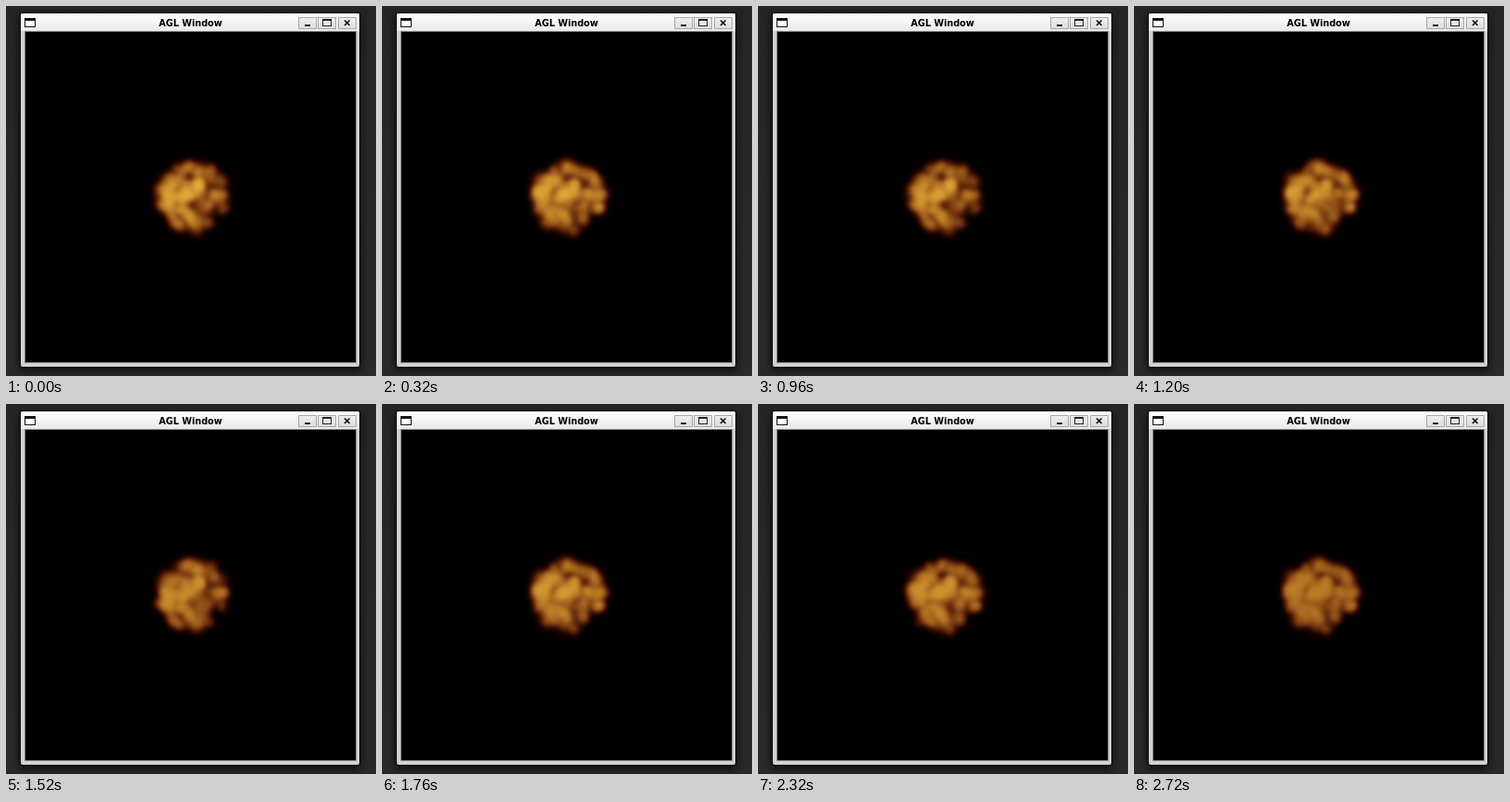
These frames come from a looping animation (400 by 400 pixels, 2880 ms). An HTML page with a canvas:

```html
<!DOCTYPE html>
<html lang="en">
<head>
<meta charset="utf-8">
<title>AGL Window</title>
<style>
html, body { margin: 0; width: 100%; height: 100%; overflow: hidden; background: #262628; }
canvas { display: block; width: 400px; height: 400px; }
</style>
</head>
<body>
<canvas id="stage" width="400" height="400"></canvas>
<script>
const ctx = document.getElementById('stage').getContext('2d');
const LOOP = 2880, STEP = 80, LAST = 34, LIFE = 480;
const SIZE = 120, LEFT = 141, TOP = 147;
const patch = ctx.createImageData(SIZE, SIZE);
const density = new Float32Array(SIZE * SIZE);

// time, brightest tone, how quickly overlapping puffs reach it
const HEAT = [
  [0, .98, 1], [720, .95, .95], [1200, .95, .95],
  [1520, .88, 1.1], [2000, .96, 1], [2720, .8, 1.3]
];

const mix = (a, b, k) => a + (b - a) * k;

function box(x, y, w, h, fill) {
  ctx.fillStyle = fill;
  ctx.fillRect(x, y, w, h);
}

function frame(x, y, w, h, stroke) {
  ctx.strokeStyle = stroke;
  ctx.lineWidth = 1;
  ctx.strokeRect(x + .5, y + .5, w - 1, h - 1);
}

function rounded(x, y, w, h, r, fill) {
  ctx.fillStyle = fill;
  ctx.beginPath();
  ctx.roundRect(x, y, w, h, r);
  ctx.fill();
}

function shade(y, h, top, bottom) {
  const g = ctx.createLinearGradient(0, y, 0, y + h);
  g.addColorStop(0, top);
  g.addColorStop(1, bottom);
  return g;
}

function drawWindow() {
  box(0, 0, 400, 400, shade(0, 400, '#252527', '#29292b'));
  ctx.save();
  ctx.shadowColor = 'rgba(0,0,0,.75)';
  ctx.shadowBlur = 10;
  ctx.shadowOffsetY = 3;
  rounded(15, 7, 368, 384, 3, '#101010');
  ctx.restore();
  rounded(16, 8, 366, 382, 2, '#d2d2d0');
  rounded(16, 8, 366, 19, [2, 2, 0, 0], shade(8, 19, '#ffffff', '#e9e9e8'));
  frame(20, 27, 359, 359, '#80807e');
  box(21, 28, 357, 357, '#000');

  box(20, 13, 12, 10, '#111');
  box(21, 16, 10, 6, '#fff');

  ctx.fillStyle = '#000';
  ctx.font = 'bold 9.7px "DejaVu Sans", sans-serif';
  ctx.textAlign = 'center';
  ctx.fillText('AGL Window', 199.5, 22);

  for (const x of [316, 337, 359]) {
    box(x, 12, 20, 13, shade(12, 13, '#f0f0ef', '#dcdcda'));
    frame(x, 12, 20, 13, '#a8a8a6');
  }
  box(323, 20, 6, 2, '#222');
  frame(342, 14, 10, 8, '#222');
  box(342, 14, 10, 2, '#222');
  ctx.strokeStyle = '#111';
  ctx.lineWidth = 1.7;
  ctx.beginPath();
  ctx.moveTo(366, 15.5); ctx.lineTo(371.5, 21);
  ctx.moveTo(371.5, 15.5); ctx.lineTo(366, 21);
  ctx.stroke();
}

function randomFrom(seed) {
  return () => {
    seed = (Math.imul(seed, 1664525) + 1013904223) >>> 0;
    return seed / 4294967296;
  };
}

const random = randomFrom(77);
const puffs = Array.from({ length: 120 }, () => ({
  angle: random() * 2 * Math.PI,
  reach: 37 * Math.sqrt(random()),
  sigma: 3.6 + random() * 2,
  birth: random()
}));

function heatAt(t) {
  const i = Math.max(1, HEAT.findIndex(k => k[0] >= t));
  const a = HEAT[i - 1], b = HEAT[i];
  const k = (t - a[0]) / (b[0] - a[0]);
  return a.map((v, n) => mix(v, b[n], k));
}

function addPuff(cx, cy, sigma, weight) {
  const r = Math.ceil(sigma * 3), x0 = Math.round(cx), y0 = Math.round(cy);
  for (let y = y0 - r; y <= y0 + r; y++) {
    for (let x = x0 - r; x <= x0 + r; x++) {
      const d2 = (x - cx) ** 2 + (y - cy) ** 2;
      density[y * SIZE + x] += weight * Math.exp(-d2 / (2 * sigma * sigma));
    }
  }
}

function drawFire(time) {
  const [, peak, gain] = heatAt(time);
  density.fill(0);
  addPuff(46, 62, 6, .5);
  for (const p of puffs) {
    const age = (time / LIFE + p.birth) % 1;
    const r = p.reach * mix(.88, 1.08, age);
    const weight = .62 * Math.sin(Math.PI * age);
    addPuff(60 + r * Math.cos(p.angle), 60 + r * Math.sin(p.angle), p.sigma, weight);
  }
  density.forEach((d, n) => {
    const t = peak * (1 - Math.exp(-gain * d));
    patch.data.set([235 * t, 185 * t ** 1.7, 62 * t ** 2, 255], n * 4);
  });
  ctx.putImageData(patch, LEFT, TOP);
}

let shown = -1;
function tick() {
  const step = Math.min(LAST, Math.floor(performance.now() % LOOP / STEP));
  if (step !== shown) {
    shown = step;
    drawFire(step * STEP);
  }
  requestAnimationFrame(tick);
}

drawWindow();
tick();
</script>
</body>
</html>
```
